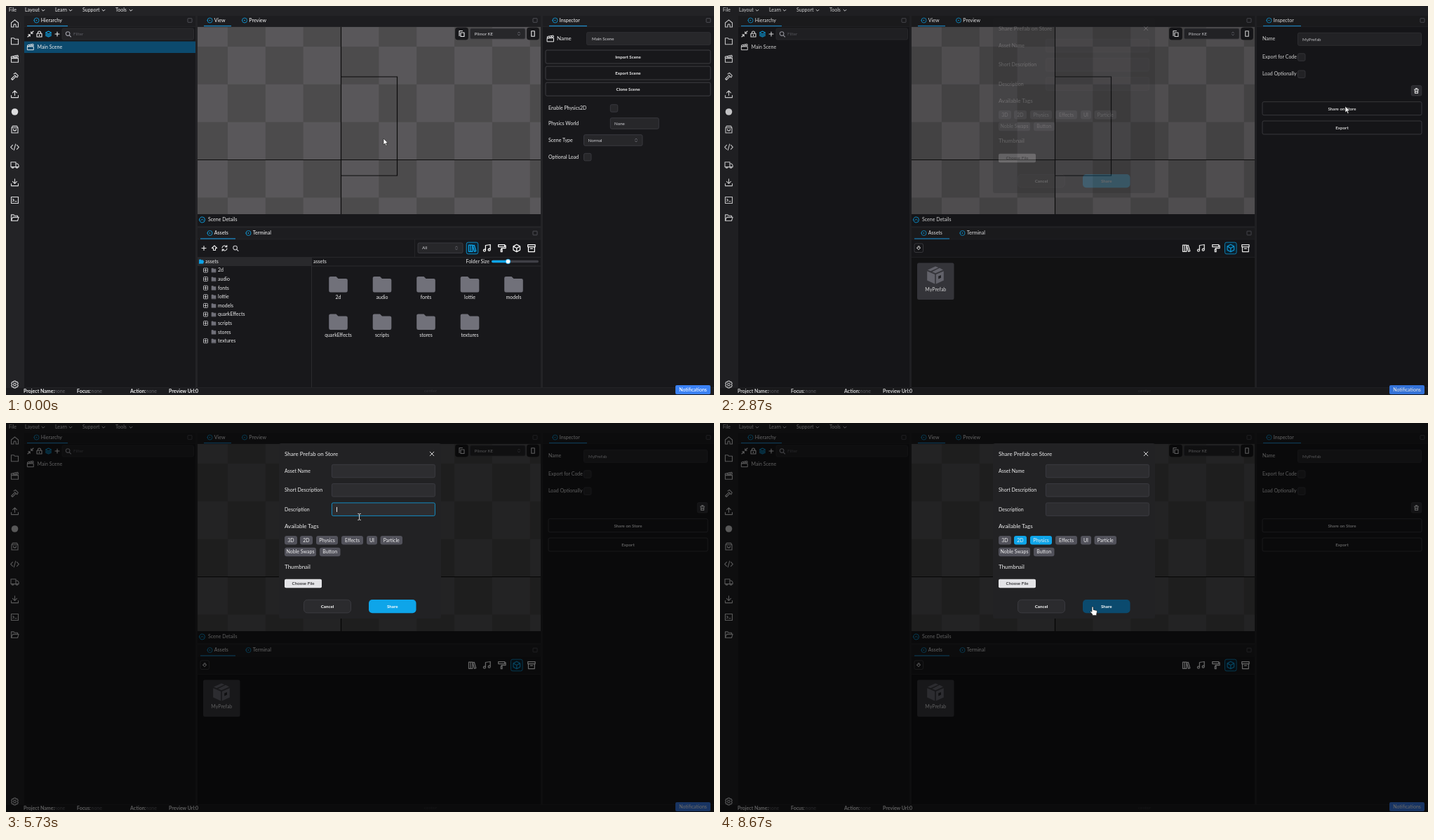
Recreate the animation shown at these times as an HTML page. Size 1009 by 555 pixels, loop 9340 ms.

```html
<!DOCTYPE html>
<html lang="en">
<head>
<meta charset="utf-8">
<title>Share a prefab</title>
<style>
html, body { margin: 0; width: 100%; height: 100%; overflow: hidden; background: #232326; }
svg { display: block; width: 100vw; height: 100vh; font-family: Lato, "Open Sans", sans-serif; }
text { white-space: pre; }
</style>
</head>
<body>
<svg id="stage" viewBox="0 0 1009 555" preserveAspectRatio="none"></svg>
<script>
const LOOP = 9340, STEP = 1000 / 15;
const BLUE = '#0ea5e9', INK = '#ededee', PANEL = '#18181b', FRAME = '#232326', EDGE = '#3f3f46', FIELD = '#27272a';

// Drawing helpers
const rect = (x, y, w, h, fill, more = '') => `<rect x="${x}" y="${y}" width="${w}" height="${h}" fill="${fill}" ${more}/>`;
const box = (x, y, w, h, fill = FIELD, stroke = EDGE, r = 2, more = '') =>
  rect(x, y, w, h, fill, `rx="${r}" stroke="${stroke}" stroke-width=".8" ${more}`);
const text = (x, y, str, size = 7, fill = INK, more = '') =>
  `<text x="${x}" y="${y + size * .35}" font-size="${size}" fill="${fill}" ${more}>${str}</text>`;
const mid = (x, y, str, size = 7, fill = INK, more = '') => text(x, y, str, size, fill, `text-anchor="middle" ${more}`);
const strong = 'font-weight="700"';
const icon = (x, y, d, color = INK, scale = 1, width = 1.1, fill = 'none') =>
  `<path transform="translate(${x} ${y}) scale(${scale})" d="${d}" fill="${fill}" stroke="${color}" stroke-width="${width}" stroke-linecap="round" stroke-linejoin="round"/>`;
const group = (id, content, more = '') => `<g id="${id}" ${more}>${content}</g>`;
const ring = r => `M${-r} 0a${r} ${r} 0 1 1 ${2 * r} 0a${r} ${r} 0 1 1 ${-2 * r} 0Z`;

const ART = {
  home: 'M-5-1L0-5.2L5-1V5H1.6V2.5a1.6 1.6 0 0 0-3.2 0V5H-5Z',
  folder: 'M-5 4.5V-4.5H-1.5L0-3H5V4.5Z',
  clapper: 'M-5-.8H5V4.8H-5ZM-5-.8L-5.2-3L4.4-5L5-2.6L-5-.8M-2.5-3.6L-.5-1.7M.8-4.2L2.8-2.2',
  hammer: 'M-4.8 3.4L.3-1.7L1.8-.2L-3.3 4.9ZM-1.4-3.6L1-5.2L4.8-1.3L3.3 1.3L1.8-.2',
  upload: 'M0 1.8V-5M-3-2L0-5L3-2M-5 1.8V4.8H5V1.8',
  bag: 'M-4.5-2.5V4.8H4.5V-2.5ZM-4.5-2.5L-3.2-4.8H3.2L4.5-2.5M-2-.3a2 2 0 0 0 4 0',
  code: 'M-3-3L-5.8 0L-3 3M3-3L5.8 0L3 3M1.2-4.3L-1.2 4.3',
  truck: 'M-5.5-3.8H1.5V3H-5.5ZM1.5-1.6H4L5.6.6V3H1.5M-4.2 3.4a1.3 1.3 0 1 0 2.6 0M1.8 3.4a1.3 1.3 0 1 0 2.6 0',
  download: 'M0-5V1.4M-3-1.4L0 1.6L3-1.4M-5 1.8V4.8H5V1.8',
  terminal: 'M-5-4.5H5V4.5H-5ZM-2.7-1.6L-1.2 0L-2.7 1.6M.3 1.8H2.6',
  opened: 'M-5 4.3V-4.3H-1.5L0-2.9H4V-.8M-5 4.3L-3-.8H5.6L4 4.3Z',
  gear: ring(1.8) + 'M-1.2-5H1.2L1.7-3.5L3.6-3.8L4.8-1.6L3.8 0L4.8 1.6L3.6 3.8L1.7 3.5L1.2 5H-1.2L-1.7 3.5L-3.6 3.8L-4.8 1.6L-3.8 0L-4.8-1.6L-3.6-3.8L-1.7-3.5Z',
  books: 'M-5-4.5H-2.3V4.8H-5ZM-2.3-4.5H.4V4.8H-2.3ZM.6-3.6L2.8-4.2L5.3 4.2L3.1 4.8Z',
  music: 'M-2.2 3V-4L4.6-5V2M-5.2 3.2a1.5 1.5 0 1 0 3 0a1.5 1.5 0 1 0-3 0M1.6 2.2a1.5 1.5 0 1 0 3 0a1.5 1.5 0 1 0-3 0',
  roller: 'M-5-5H4V-2H-5ZM4-3.6H5.4V0H-.5V1.6M-1.4 1.6H.4V5.2H-1.4Z',
  cube: 'M0-5.3L4.8-2.6V2.6L0 5.3L-4.8 2.6V-2.6ZM-4.8-2.6L0 0L4.8-2.6M0 0V5.3',
  archive: 'M-5.2-4.8H5.2V-1.8H-5.2ZM-4.4-1.8V5H4.4V-1.8M-1.5.6H1.5',
  plus: 'M-3 0H3M0-3V3',
  search: 'M1.8 1.8L4 4M-3.2-.4a2.8 2.8 0 1 1 5.6 0a2.8 2.8 0 1 1-5.6 0',
  chevron: 'M-2-1L0 1L2-1',
  sort: 'M-1.5-1L0-2.4L1.5-1M-1.5 1L0 2.4L1.5 1',
  lock: 'M-3.5-.7H3.5V4H-3.5ZM-2-.7V-2a2 2 0 0 1 4 0V-.7M0 1V2.4',
  layers: 'M0-4L4-2L0 0L-4-2ZM-4 0L0 2L4 0M-4 2L0 4L4 2',
  shrink: 'M4-4L.8-.8M.8-3.2V-.8H3.2M-4 4L-.8.8M-.8 3.2V.8H-3.2',
  refresh: 'M-3.5-.5A3.6 3.6 0 0 1 3-2M3.3-4V-1.7H1M3.5.5A3.6 3.6 0 0 1-3 2M-3.3 4V1.7H-1',
  phone: 'M-2.2-3.8H2.2V3.8H-2.2Z',
  rotate: 'M-1.5-1.5H3.5V4H-1.5ZM-3.5 3V-4H1',
  trash: 'M-3-2H3M-2.4-2L-2 3.5H2L2.4-2M-1-2V-3.4H1V-2M-.8 0V1.8M.8 0V1.8',
  arrowUp: 'M0-3.6L3.6 0H1.5V3H-1.5V0H-3.6Z',
  arrowDown: 'M0 3L3 0H1.2V-2.6H-1.2V0H-3Z',
  cross: 'M-2.8-2.8L2.8 2.8M2.8-2.8L-2.8 2.8'
};

const tab = (x, y, name, from, to) =>
  icon(x, y, ring(3.5), BLUE, 1, .8) + icon(x, y, ring(.5), BLUE, 1, .5, BLUE) + text(x + 6.3, y, name, 7, INK, 'font-weight="500"') +
  (to ? rect(from, y + 7.4, to - from, 1.2, '#1d8fd0') : '');
const maximize = (x, y) => box(x - 3, y - 2.8, 6, 5.6, 'none', '#5b5b62', .5);
const button = (x, y, w, label) => box(x, y, w, 19, PANEL, '#48484d', 2) + mid(x + w / 2, y + 9.8, label, 6.2, INK, strong);
const check = (x, y) => box(x, y, 10.5, 10.5, FIELD, EDGE, 2);
const select = (x, y, w, h, label) =>
  box(x, y, w, h) + text(x + 6, y + h / 2, label, 6.2, '#d4d4d8') + icon(x + w - 9, y + h / 2, ART.sort, '#71717a', 1, .8);
const smallFolder = (x, y, color) => icon(x, y, ART.folder, color, .6, 1, color);

function checker() {
  const cell = 53.85, x0 = 477.5, y0 = 219.5;
  let out = rect(273, 30, 489, 267, '#4c4b4c');
  for (let j = -4; j < 2; j++) for (let i = -4; i < 6; i++)
    if ((i + j) % 2 === 0) out += rect(x0 + i * cell, y0 + j * cell, cell, cell, '#59575a');
  const lines = `M${x0} 30V297M273 ${y0}H762M${x0} 101H557.5V242H${x0}`;
  return `<clipPath id="view"><rect x="273" y="30" width="489" height="267"/></clipPath>
    <g clip-path="url(#view)">${out}<path d="${lines}" fill="none" stroke="#0c0c0c" stroke-width="1.2"/></g>`;
}

function shell() {
  let out = rect(0, 0, 1009, 555, FRAME) + rect(0, 545, 1009, 10, '#1c1c1f');
  out += text(4, 6, 'File');
  [['Layout', 27, 53], ['Learn', 70, 92], ['Support', 109, 139], ['Tools', 156, 178]].forEach(([name, x, c]) =>
    out += text(x, 6, name) + icon(c, 6.2, ART.chevron, INK, 1, .9));
  const side = ['home', 'folder', 'clapper', 'hammer', 'upload', '', 'bag', 'code', 'truck', 'download', 'terminal', 'opened'];
  side.forEach((name, i) => {
    const y = 25 + i * 25.2;
    out += name ? icon(12.5, y, ART[name], '#dcdcde') : `<circle cx="12.5" cy="${y}" r="4.8" fill="#dcdcde"/>`;
  });
  out += icon(12.5, 540, ART.gear, '#dcdcde');
  [[26, 14, 244, 530], [273, 14, 489, 300], [273, 317.5, 489, 226.5], [765, 14, 244, 530]].forEach(([x, y, w, h]) =>
    out += rect(x, y, w, h, PANEL) + rect(x, y, w, 15, '#1d1d20') + rect(x, y + 15, w, .7, '#29292c'));
  out += tab(43.5, 20.5, 'Hierarchy', 30, 88) + tab(290.5, 20.5, 'View', 282, 321) + tab(340, 20.5, 'Preview') +
    tab(782.5, 20.5, 'Inspector', 774, 828) + tab(290.5, 324, 'Assets', 277, 327) + tab(345.5, 324, 'Terminal');
  out += maximize(262, 20.5) + maximize(754, 20.5) + maximize(754, 324) + maximize(1001, 20.5);
  out += icon(35, 40, ART.shrink) + icon(47.5, 40, ART.lock) + icon(60.5, 40, ART.layers, BLUE) + icon(73, 40, ART.plus);
  out += box(80, 32, 187.5, 16, '#232326', '#303034') + icon(88.5, 40, ART.search, '#a1a1aa') + text(96, 40, 'Filter', 6.2, '#5f5f66');
  out += group('row', rect(26, 50.5, 244, 16.5, '#0c4a6e')) + icon(35, 58.5, ART.clapper, INK, .85) + text(44.5, 58.5, 'Main Scene');
  out += checker();
  out += box(640.5, 31, 18, 17, PANEL, PANEL, 3) + icon(649.5, 39.5, ART.rotate) + select(661.5, 32, 78.5, 15, 'Plimor KE') +
    box(742.5, 31, 17, 17, PANEL, PANEL, 3) + icon(751, 39.5, ART.phone);
  out += icon(279.5, 305, ring(4), BLUE, 1, .9) + icon(279.5, 305, 'M-2 1L0-1L2 1', BLUE, 1, .9) + text(288, 305, 'Scene Details');
  out += rect(273, 358, 489, .8, '#2b2b2f');
  const status = (x, name, value, gap) => text(x, 549.5, name, 7, INK, strong) + text(x + gap, 549.5, value, 7, '#66666c');
  out += status(25, 'Project Name:', 'none', 43.8) + status(101, 'Focus:', '', 0) + status(177, 'Action:', 'none', 22.5) + text(232, 549.5, 'Preview Url:0', 7, INK, strong);
  out += `<text id="focus" x="121.5" y="552" font-size="7"></text>` + mid(605, 549, 'center', 6.5, '#333337');
  return out + rect(954, 541, 50, 13, '#3b82f6', 'rx="2"') + mid(979, 547.6, 'Notifications', 7, '#fff', 'font-weight="500"');
}

const TOOLS = ['books', 'music', 'roller', 'cube', 'archive'];
const tools = active => TOOLS.map((name, i) => {
  const x = 664.5 + i * 21.1, on = i === active;
  return (on ? box(x - 8.3, 337.2, 16.6, 16.6, '#0d2433', BLUE, 2.5) : '') + icon(x, 345.5, ART[name], on ? BLUE : '#fff', 1, 1.25);
}).join('');

function library() {
  const names = ['2d', 'audio', 'fonts', 'lottie', 'models', 'quarkEffects', 'scripts', 'stores', 'textures'];
  let out = icon(282, 345.5, ART.plus) + icon(297, 345.5, ART.arrowUp) + icon(311.5, 345.5, ART.refresh) + icon(327, 345.5, ART.search, '#c8c8cc');
  out += rect(582, 333, .7, 25, '#2b2b2f') + select(587, 338, 64, 14.5, 'All') + tools(0);
  out += rect(273, 359, 162, 12, '#29292c') + rect(435, 359, .8, 185, '#303034') + rect(436, 370.6, 326, .8, '#303034');
  out += icon(278.5, 364.5, ART.opened, BLUE, .6, 1.2, BLUE) + text(284, 364.5, 'assets') + text(438, 364.5, 'assets') + text(655.5, 364.5, 'Folder Size');
  out += rect(692, 362.8, 67, 3.4, '#3f3f46', 'rx="1.7"') + rect(692, 362.8, 23, 3.4, BLUE, 'rx="1.7"') +
    `<circle cx="715.5" cy="364.5" r="3.3" fill="#fff" stroke="${BLUE}" stroke-width=".8"/>`;
  names.forEach((name, i) => {
    const y = 377 + i * 12.6, x = 473.5 + i % 5 * 62.5, top = 397 + Math.floor(i / 5) * 53.6;
    if (name !== 'stores') out += box(281.5, y - 3, 6, 6, 'none', '#d0d0d4', .8) + icon(284.5, y, ART.plus, INK, .6, 1.2);
    out += smallFolder(296, y, '#71717a') + text(302, y, name);
    out += `<path transform="translate(${x} ${top})" d="M-11-11H-3L0-8H11Q13.3-8 13.3-6V9Q13.3 11.5 11 11.5H-11Q-13.3 11.5-13.3 9V-9Q-13.3-11-11-11Z" fill="#71717a"/>` + mid(x, top + 19, name);
  });
  return out;
}

function prefabs() {
  const face = d => `<path d="${d}" fill="#6f6f78"/>`;
  return rect(273, 358.8, 489, 185.2, '#141416') + box(277, 339, 12.5, 12.5, 'none', '#48484d', 2) + icon(283.2, 345, ART.arrowDown, INK, .85) + tools(3) +
    group('tile', rect(281, 366.5, 52.5, 52.5, '#3b3b41', 'rx="2.5"')) +
    `<g transform="translate(307 384)">${face('M0-12.5L4.3-10.8L-6.8-5.8L-11-7.5ZM6-10.2L11-7.5L0-2.8L-4.7-4.8Z')}${face('M-11.8-5.7L-.8-1V12.5L-11.8 7.5ZM11.8-5.7L.8-1V12.5L11.8 7.5Z')}<path d="M4.2 1.5L8 0V3.8L4.2 5.4Z" fill="#26262a"/></g>` +
    mid(307.3, 405, 'MyPrefab');
}

function sceneInspector() {
  return icon(776, 46.5, ART.clapper, INK, .9) + text(785, 46.5, 'Name', 8) + box(827.5, 37.5, 176.5, 18, FIELD, '#303034') + text(835, 46.7, 'Main Scene', 6.2, '#d4d4d8') +
    ['Import Scene', 'Export Scene', 'Clone Scene'].map((s, i) => button(769, 63 + i * 23.1, 235, s)).join('') +
    text(773, 146, 'Enable Physics2D') + check(861.3, 140.7) + text(773, 167.5, 'Physics World') + box(861.3, 159.7, 69, 15.6) + text(867, 167.7, 'None', 6.2, '#d4d4d8') +
    text(773, 191.5, 'Scene Type') + select(823.5, 183.7, 83.5, 15.6, 'Normal') + text(773, 215.5, 'Optional Load') + check(823.5, 210.3);
}

function prefabInspector() {
  return text(773, 47, 'Name') + box(823.5, 38.3, 176, 18, FIELD, '#38383c') + text(830, 47.5, 'MyPrefab', 6.2, '#d4d4d8') +
    text(773, 73, 'Export for Code') + check(823.5, 67.8) + text(773, 97, 'Load Optionally') + check(823.5, 92) +
    box(985.3, 113.5, 14.5, 14.5, '#303034', EDGE, 2) + icon(992.5, 121, ART.trash) +
    button(773, 136.7, 227, 'Share on Store').replace('<rect', '<rect id="shareRow"') + button(773, 164, 227, 'Export');
}

function dialog() {
  let out = rect(389, 29, 231, 250, '#222224', 'rx="3"') + text(397, 44, 'Share Prefab on Store', 8) + icon(607, 44, ART.cross, INK, 1, .9);
  ['Asset Name', 'Short Description', 'Description'].forEach((name, i) => {
    const y = 59.3 + i * 27.3;
    out += text(397, y + 9.4, name) + box(464.4, y, 147, 18.5, '#2d2d30', EDGE, 2, `id="field${i}"`) +
      rect(471, y + 6, .9, 7, '#fff', `id="caret${i}"`);
  });
  out += text(397, 147, 'Available Tags', 8) + text(397, 204.7, 'Thumbnail', 8);
  [['3D', 397, 415], ['2D', 419, 437], ['Physics', 442, 473], ['Effects', 478, 509], ['UI', 514, 529], ['Particle', 533.5, 565],
   ['Noble Swaps', 397, 442], ['Button', 447, 476.5]].forEach(([name, a, b], i) => {
    const y = i < 6 ? 167.3 : 184;
    out += rect(a, y - 6.2, b - a, 12.4, '#52525b', `rx="3" id="tag${i}"`) + mid((a + b) / 2, y, name);
  });
  return out + rect(397, 222.8, 53, 12.4, '#e4e4e7', 'rx="2" id="choose"') + mid(423.5, 229.3, 'Choose File', 6.2, '#18181b', 'font-weight="500"') +
    box(424.5, 252.3, 67, 18.6, '#2b2b2e', EDGE, 5) + mid(458, 262, 'Cancel', 6.2, '#fff', strong) +
    rect(517, 252, 67.5, 19.2, BLUE, 'rx="5" id="share"') + mid(550.7, 262, 'Share', 6.2, '#fff', strong);
}

const pointers = {
  arrow: '<path d="M0 0V9L2.1 7.1L3.6 10.4L5 9.8L3.6 6.6H6.4Z" fill="#fff" stroke="#111" stroke-width=".6"/>',
  hand: '<path d="M-1 1Q-1 0 0 0T1 1V4.4L5.4 5.5Q6.6 5.8 6.4 7.4L5.6 10.4V12.4H-.3V11L-3.2 7.6Q-3.6 6.6-2.4 6.4L-1 7.4Z" fill="#fff" stroke="#111" stroke-width=".6"/>',
  beam: '<path d="M-2.2-4.5Q0-4.5 0-3.6Q0-4.5 2.2-4.5M0-3.6V3.6M-2.2 4.5Q0 4.5 0 3.6Q0 4.5 2.2 4.5" fill="none" stroke="#e8e8e8" stroke-width=".9"/>'
};

const stage = document.getElementById('stage');
stage.innerHTML = shell() + group('library', library()) + group('prefabs', prefabs()) +
  group('sceneInfo', sceneInspector()) + group('prefabInfo', prefabInspector()) +
  group('tooltip', rect(712, 318, 31.5, 13.5, '#0b0b0c', 'rx="2"') + mid(727.7, 324.8, 'Prefabs', 6.8, '#c4c4c8')) +
  rect(0, 0, 1009, 555, '#000', 'id="shade"') + group('dialog', dialog()) +
  group('cursor', Object.entries(pointers).map(([name, art]) => group(name, art)).join(''));

// Motion
const el = id => document.getElementById(id);
const show = (id, on) => el(id).setAttribute('display', on ? 'inline' : 'none');
const paint = (id, attr, value) => el(id).setAttribute(attr, value);
const within = (t, a, b) => t >= a && t < b;
const clamp = v => Math.min(1, Math.max(0, v));

// time, x, y of the pointer's hot spot
const path = [
  [0, 538, 189], [330, 640, 265], [670, 726, 344], [900, 728, 346], [1067, 652, 347.5],
  [1270, 420, 374], [1470, 314, 388], [1800, 312, 388], [2000, 400, 373], [2067, 615, 275],
  [2133, 795, 194], [2267, 872, 157], [2467, 891, 143], [3000, 891, 143], [3270, 640, 100],
  [3600, 527, 77.5], [4067, 527, 77.5], [4333, 520, 100], [4667, 520, 100], [5067, 518, 123],
  [5600, 518, 123], [6200, 453, 172], [6533, 455, 172], [6733, 433, 172], [7000, 432, 172],
  [7200, 412, 226], [7400, 424, 230], [7667, 440, 246], [8200, 528, 262], [8533, 531, 262]
];

function pointerAt(t) {
  const k = path.findIndex(p => p[0] > t);
  if (k < 0) return path[path.length - 1].slice(1);
  const [a, b] = [path[k - 1], path[k]], u = (t - a[0]) / (b[0] - a[0]);
  return [1, 2].map(i => a[i] + (b[i] - a[i]) * u);
}

function render(t) {
  const opened = t >= 800, picked = t >= 1660;
  show('library', !opened);
  show('prefabs', opened);
  show('tile', picked);
  show('row', !picked);
  show('sceneInfo', !picked);
  show('prefabInfo', picked);
  show('tooltip', within(t, 800, 1190));
  paint('shareRow', 'fill', within(t, 2250, 2860) ? '#27272a' : PANEL);

  const focused = within(t, 1660, 2720);
  el('focus').textContent = focused ? 'assets' : 'none';
  paint('focus', 'fill', focused ? INK : '#66666c');

  const p = clamp((t - 2807) / 300);
  paint('shade', 'opacity', .6 * p);
  paint('dialog', 'opacity', p);
  paint('dialog', 'transform', `translate(0 ${-15 * (1 - p)})`);

  const focus = [within(t, 2990, 4730), within(t, 4730, 5590), within(t, 5590, 6460)];
  const caret = [within(t, 3060, 3560) || within(t, 4060, 4730), within(t, 4730, 5320), within(t, 5590, 6120)];
  focus.forEach((on, i) => {
    paint('field' + i, 'stroke', on ? BLUE : EDGE);
    show('caret' + i, caret[i]);
  });
  paint('tag2', 'fill', t >= 6460 ? BLUE : '#52525b');
  paint('tag1', 'fill', t >= 6790 ? BLUE : '#52525b');
  paint('choose', 'fill', within(t, 7190, 7590) ? '#d0d0d4' : '#e4e4e7');
  paint('share', 'fill', t >= 8130 ? '#0b4a6e' : BLUE);

  const [x, y] = pointerAt(t);
  const hand = within(t, 600, 1100) || within(t, 6130, 7060) || t >= 8130;
  const beam = within(t, 3460, 5900);
  paint('cursor', 'transform', `translate(${x} ${y})`);
  show('hand', hand);
  show('beam', beam);
  show('arrow', !hand && !beam);
}

function tick(now) {
  const t = now % LOOP;
  render(Math.floor((t + 5) / STEP) * STEP);
  requestAnimationFrame(tick);
}
render(0);
requestAnimationFrame(tick);
</script>
</body>
</html>
```
